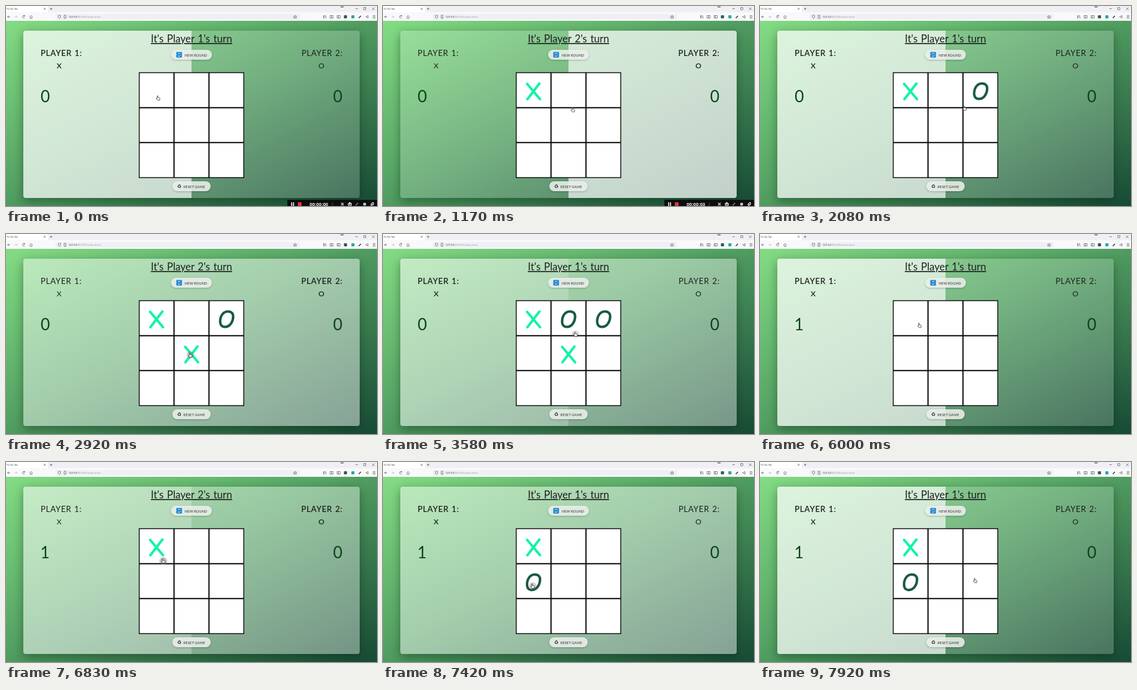
These frames come from a looping animation (600x324 px, 8000 ms). An HTML page:

```html
<!DOCTYPE html>
<html lang="en">
<head>
<meta charset="utf-8">
<title>Tic Tac Toe</title>
<style>
  html, body { margin: 0; width: 100%; height: 100%; overflow: hidden; }
  #stage { position: relative; width: 600px; height: 324px; overflow: hidden; background: #f9f9fb; }
  #page { position: absolute; inset: 24px 0 0; background: linear-gradient(to bottom right, #84dc84, #55a364 45%, #174a35); }
  #card { position: absolute; left: 28px; top: 16px; width: 544px; height: 271px; border-radius: 4px;
    overflow: hidden; }
  #shade { position: absolute; left: 28px; top: 16px; width: 544px; height: 271px; border-radius: 4px;
    box-shadow: 0 5px 16px rgba(0, 30, 10, .4); }
  .half { position: absolute; top: 0; width: 272px; height: 271px; background: #fff; }
  svg { position: absolute; left: 0; top: 0; }
  text { font-family: Lato, "Open Sans", sans-serif; fill: #1d211e; }
  #title { font-size: 16.5px; word-spacing: .07em; text-anchor: middle; text-decoration: underline; }
  .name { font-size: 13px; letter-spacing: .6px; word-spacing: .07em; }
  .sign { font-size: 12px; text-anchor: middle; }
  .score { font-size: 26px; fill: #0b4518; }
  .end { text-anchor: end; }
  .label { font-size: 5.6px; letter-spacing: .1px; fill: #2b2f2c; }
  .pill { fill: #f1f5f1; fill-opacity: .86; filter: drop-shadow(0 1.5px 1.5px rgba(0, 30, 10, .3)); }
  .tiny { font-size: 4px; font-family: "Open Sans", sans-serif; }
  .line { fill: none; stroke: #55555c; stroke-width: .7; }
  .white { fill: none; stroke: #fff; stroke-width: 1; }
  #clock { font: 700 7.5px "Liberation Sans", Arial, sans-serif; fill: #fff; }
  .x { stroke: #12f3a8; }
  .o { stroke: #1a5a42; }
  .x, .o { fill: none; stroke-width: 4; stroke-linecap: round; }
</style>
</head>
<body>
<div id="stage">
  <div id="page">
    <div id="shade"></div>
    <div id="card">
      <div class="half" id="half1" style="left:0"></div>
      <div class="half" id="half2" style="left:272px"></div>
    </div>
  </div>
  <svg width="600" height="324" viewBox="0 0 600 324">
    <!-- browser bar -->
    <rect width="600" height="10" fill="#f0f0f4"/>
    <rect width="68" height="10" fill="#fff"/>
    <rect y="10" width="600" height="14" fill="#f9f9fb"/>
    <rect x="80" y="13" width="395" height="9" rx="1.5" fill="#f0f0f4"/>
    <text class="tiny" x="1" y="6.3" style="font-size:3.7px">Tic Tac Toe</text>
    <path class="line" d="M61 3l3 3m0-3l-3 3M71 4.5h4m-2-2v4M565 4.5h4M578.5 2.5h3.500v3.500h-3.500zM592 2.500l4 4m0-4l-4 4"/>
    <path d="M541 1.500h5" stroke="#333" stroke-width="1"/>
    <path class="line" d="M6.500 17.500h-4l2-2m-2 2l2 2"/>
    <path class="line" style="stroke:#bbb" d="M14 17.500h4l-2-2m2 2l-2 2"/>
    <path class="line" d="M30 16a2 2 0 1 0 .3 2.500m0-4v2h-2M38 17.500l2.500-2 2.500 2m-4 0v2.500h3v-2.500"/>
    <path class="line" d="M84.500 15.500l2-.7 2 .7q0 3.500-2 4.800q-2-1.300-2-4.800zM94 15h2.800v5h-2.800z"/>
    <text class="tiny" x="101" y="19" style="font-size:4.3px">127.0.0.1<tspan fill="#96969c">:5500/index.html</tspan></text>
    <path class="line" d="M467.500 15l.8 1.800 1.900.1-1.500 1.200.6 2-1.800-1.100-1.800 1.100.6-2-1.500-1.200 1.900-.1z"/>
    <path class="line" d="M513.500 15v5m1.500-5v5m1.500-5l1.500 5M524 15.500h5v4h-5zm2.500 0v4M535.500 15.500h5v4h-5zm2 0v4"/>
    <rect x="546.500" y="15" width="5" height="5" rx="1" fill="#315a46"/>
    <rect x="558.500" y="15" width="5" height="5" rx="1" fill="#27a6a4"/>
    <path d="M570.500 19.500l3.500-3.500" stroke="#222" stroke-width="1.300"/>
    <path class="line" d="M581.500 17.500l4-2v4zM593 15.500h4.500m-4.500 2h4.500m-4.500 2h4.500"/>

    <!-- game -->
    <text id="title" x="300" y="59"></text>
    <text class="name" id="name1" x="56" y="81">PLAYER 1:</text>
    <text class="name end" id="name2" x="544.500" y="81">PLAYER 2:</text>
    <text class="sign" id="sign1" x="86" y="101">X</text>
    <text class="sign" id="sign2" x="510" y="101">O</text>
    <text class="score" id="score" x="56" y="156">0</text>
    <text class="score end" x="544" y="156">0</text>

    <rect class="pill" x="267" y="71" width="66" height="16" rx="8"/>
    <rect x="275.500" y="74.500" width="9" height="9" rx="1" fill="#1683d2"/>
    <path class="white" d="M278 78.500a2.200 2.200 0 0 1 4-1m0 2a2.200 2.200 0 0 1-4 1"/>
    <text class="label" x="289" y="81.500">NEW ROUND</text>
    <rect class="pill" x="269" y="284" width="62" height="16" rx="8"/>
    <text x="276.500" y="295" style="font:8px 'DejaVu Sans',sans-serif">&#x267B;&#xFE0E;</text>
    <text class="label" x="287" y="294.500">RESET GAME</text>

    <g id="board"></g>

    <!-- recorder -->
    <g id="recorder">
      <rect x="455" y="314" width="145" height="10" fill="#0d0d0f"/>
      <path d="M462 318v6m3-6v6" stroke="#fff" stroke-width="1.500"/>
      <rect x="472" y="318" width="6" height="6" rx="1" fill="#d93a43"/>
      <text id="clock" x="491" y="323.500"></text>
      <path d="M528 318v6" stroke="#666" stroke-width=".7"/>
      <g class="white">
        <circle cx="544" cy="321" r="1.300"/>
        <path d="M541.500 318.500l1 1m4-1l-1 1m-4 4l1-1m4 1l-1-1"/>
        <path d="M553.500 319.500h5v3.500h-5zm1.500-1h2M565.500 323l4-4"/>
        <path d="M590.500 320v3h3m-1.500-4.500h2.500v3h-2.500z"/>
      </g>
      <circle cx="556" cy="321" r="1" fill="#fff"/>
      <circle cx="580" cy="321" r="2.300" fill="#fff"/>
      <circle cx="580" cy="321" r=".8" fill="#111"/>
    </g>

    <g id="cursor">
      <circle id="press" r="6" fill="#777"/>
      <path d="M-1.600 .6V-3.200q.7-1.100 1.400 0V-.8l2.300.6q.9.300.9 1.200L2.400 3.600H-.8L-2.900 1q0-1.200 1.300-.4z"
        fill="#fff" stroke="#222" stroke-width=".7" stroke-linejoin="round"/>
    </g>
  </svg>
</div>
<script>
const LOOP = 8000, FADE = 400;
const $ = id => document.getElementById(id);

// time, player to move, cell, mark; a cell of -1 clears the board
const moves = [
  [350, 2, 0, 'x'], [1650, 1, 2, 'o'], [2720, 2, 4, 'x'], [3350, 1, 1, 'o'],
  [4080, 1, 8, 'x'], [5250, 1, -1], [6670, 2, 0, 'x'], [7220, 1, 3, 'o']
];
const WIN = 4080, RESET = 5250, HIDE_RECORDER = 1750;

// time, x, y
const path = [
  [0, 246, 149], [650, 246, 149], [1170, 307, 168], [1500, 355, 143], [1780, 355, 143],
  [2450, 298, 196], [2950, 298, 196], [3230, 302, 143], [3450, 302, 143], [3920, 351, 245],
  [4400, 351, 245], [5080, 304, 80], [5350, 304, 80], [5880, 258, 148], [6700, 258, 148],
  [7120, 242, 201], [7450, 242, 201], [7900, 348, 192], [LOOP, 348, 192]
];

const clamp = v => Math.max(0, Math.min(1, v));
const smooth = v => v * v * (3 - 2 * v);

const glyphs = {
  x: 'M-10.500-12L10.500 13M9.500-12.500L-10 13',
  o: 'M2-12.500C-7-12.500-11-3-10.500 5C-10 11-6 13-2 12.500C6 12 10.500 3 10.500-4.500C10.500-10 7-12.500 2-12.500z'
};

function buildBoard() {
  let html = '<rect x="215.500" y="108" width="169" height="170" fill="#fff" stroke="#0a0a0a" stroke-width="1.400"/>' +
    '<path d="M271.700 108v170M328.300 108v170M215 164.700h170M215 221.300h170" stroke="#0a0a0a" stroke-width="2"/>';
  moves.forEach(([, , cell, mark], i) => {
    if (cell < 0) return;
    const x = 243.5 + cell % 3 * 56.7, y = 138 + Math.floor(cell / 3) * 56.8;
    html += `<path id="mark${i}" class="${mark}" transform="translate(${x} ${y})" d="${glyphs[mark]}"/>`;
  });
  $('board').innerHTML = html;
}

function setText(id, value) {
  if ($(id).textContent !== value) $(id).textContent = value;
}

function cursorAt(t) {
  const i = Math.max(1, path.findIndex(p => p[0] > t));
  const [t0, x0, y0] = path[i - 1], [t1, x1, y1] = path[i];
  const k = smooth(clamp((t - t0) / (t1 - t0)));
  return [x0 + (x1 - x0) * k, y0 + (y1 - y0) * k];
}

function render(t) {
  let turn = 1, share = 1, press = 0;
  for (const [at, next] of moves) {
    if (t < at) break;
    const k = smooth(clamp((t - at) / FADE));
    if (next !== turn) share = next === 1 ? k : 1 - k;
    turn = next;
    press = 1 - clamp((t - at) / 330);
  }
  $('half1').style.opacity = .2 + .53 * share;
  $('half2').style.opacity = .73 - .53 * share;

  moves.forEach(([at, , cell], i) => {
    if (cell < 0) return;
    const shown = t >= at && (at > RESET || t < RESET);
    $('mark' + i).style.display = shown ? '' : 'none';
  });

  for (const n of [1, 2]) {
    const weight = n === turn ? 600 : 400;
    $('name' + n).style.fontWeight = $('sign' + n).style.fontWeight = weight;
  }
  const won = t >= WIN && t < RESET;
  setText('title', won ? 'PLAYER 1 has WON this round!' : `It's Player ${turn}'s turn`);
  setText('score', t >= WIN ? '1' : '0');
  $('score').setAttribute('x', t >= WIN ? 55.5 : 56);

  $('recorder').style.display = t < HIDE_RECORDER ? '' : 'none';
  setText('clock', '00:00:0' + Math.floor(t / 385));

  const [x, y] = cursorAt(t);
  $('cursor').setAttribute('transform', `translate(${x} ${y})`);
  $('press').style.opacity = press * .9;
}

buildBoard();
const start = performance.now();
function tick() {
  render((performance.now() - start) % LOOP);
  requestAnimationFrame(tick);
}
tick();
</script>
</body>
</html>
```
